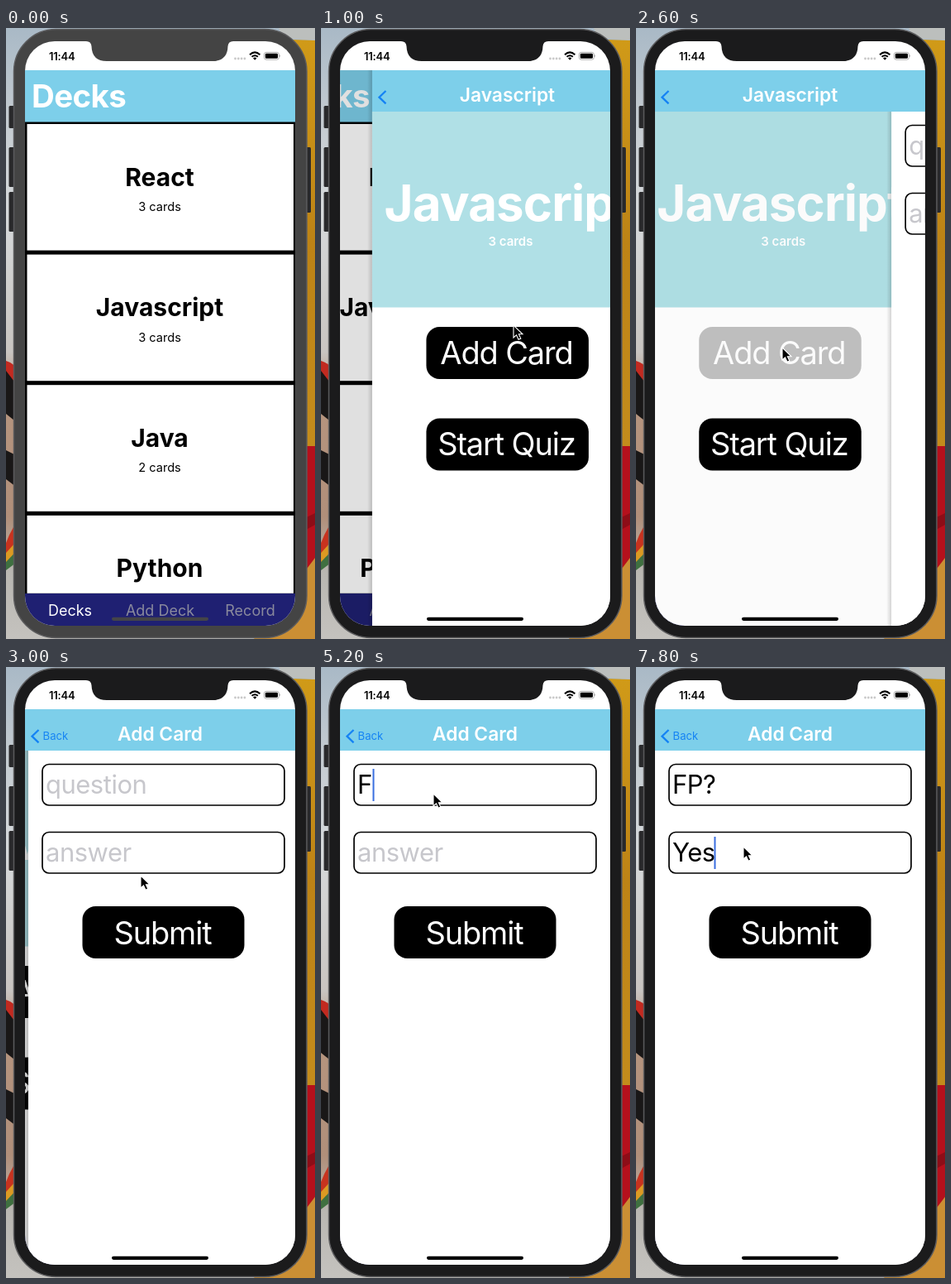
These frames come from a looping animation (374x738 px, 8000 ms). An HTML page:

```html
<!DOCTYPE html>
<html lang="en">
<head>
<meta charset="utf-8">
<title>Flash cards</title>
<style>
  html, body { margin: 0; width: 100%; height: 100%; overflow: hidden; background: #d8dadb; }
  svg { display: block; width: 374px; height: 738px; font-family: Inter, Roboto, sans-serif; }
  .mid { text-anchor: middle; }
  .deck { font-size: 30px; font-weight: 700; }
  .count { font-size: 14.6px; }
  .title { font-size: 22.8px; font-weight: 600; fill: #fff; }
  .button { font-size: 38px; letter-spacing: -1.15px; fill: #fff; }
  .field { font-size: 31px; letter-spacing: -.5px; }
  .tab { font-size: 18px; fill: #8a8a9d; }
  .box { fill: #fff; stroke: #000; stroke-width: 1.7; }
</style>
</head>
<body>
<svg viewBox="0 0 374 738">
  <defs>
    <clipPath id="glass"><rect x="23" y="16" width="327" height="706" rx="36"/></clipPath>
    <linearGradient id="edge">
      <stop offset="0" stop-opacity="0"/><stop offset="1" stop-opacity=".16"/>
    </linearGradient>
    <linearGradient id="wall" x2="0" y2="1">
      <stop offset="0" stop-color="#a9b9c6"/><stop offset=".14" stop-color="#c3cad0"/>
      <stop offset=".3" stop-color="#d6d9db"/><stop offset=".53" stop-color="#c9c5c1"/>
      <stop offset=".6" stop-color="#b6957f"/><stop offset=".8" stop-color="#b08f7a"/>
      <stop offset=".89" stop-color="#b9b7b2"/><stop offset="1" stop-color="#c4c2be"/>
    </linearGradient>
    <linearGradient id="gold" x2="0" y2="1">
      <stop offset="0" stop-color="#d09a18"/><stop offset=".5" stop-color="#bd8316"/>
      <stop offset="1" stop-color="#c48c1c"/>
    </linearGradient>
  </defs>

  <!-- wallpaper -->
  <rect width="374" height="738" fill="url(#wall)"/>
  <path d="M330 0H374V15L336 12Z" fill="#bcbfbd"/>
  <path d="M345 14L374 15V506H345Z" fill="url(#gold)"/>
  <path d="M345 505H374V690H345Z" fill="#b5101c"/>
  <path d="M345 600L374 586V600L345 616Z" fill="#8d0d17"/>
  <path d="M300 738L374 640V738Z" fill="#cb8f34"/>
  <path d="M0 402Q10 404 20 420V440L0 418Z" fill="#c22a20"/>
  <path d="M0 414L20 440V482L0 466ZM0 510L20 520V560L0 545Z" fill="#191717"/>
  <path d="M0 622Q8 600 20 590V618L0 640Z" fill="#c8331f"/>
  <path d="M0 634L20 612V628L0 648Z" fill="#dc9a23"/>
  <path d="M0 645L20 624V640L0 655Z" fill="#3f7040"/>

  <!-- phone body -->
  <g fill="#29292b">
    <rect x="3.5" y="94" width="8" height="27" rx="1.5"/>
    <rect x="3.5" y="144" width="8" height="48" rx="1.5"/>
    <rect x="3.5" y="198" width="8" height="48" rx="1.5"/>
    <rect x="362" y="144" width="7" height="79" rx="1.5"/>
  </g>
  <rect id="bezel" x="9.5" y="1.5" width="354.5" height="735" rx="51" stroke="#5b5b5d" stroke-width="1.5"/>

  <g clip-path="url(#glass)">
    <rect x="23" y="16" width="327" height="706" fill="#fff"/>

    <g id="list">
      <rect x="23" y="113" width="327" height="571"/>
      <rect x="23" y="51" width="327" height="62.5" fill="#7dcfea"/>
      <text x="31" y="96" fill="#fff" font-size="38.5" font-weight="700" letter-spacing="-.6">Decks</text>
      <g id="decks"></g>
      <rect x="23" y="683" width="327" height="39" fill="#1f2072"/>
      <text class="tab mid" x="77.5" y="710" style="fill:#fff">Decks</text>
      <text class="tab mid" x="186.5" y="710">Add Deck</text>
      <text class="tab mid" x="295.5" y="710">Record</text>
    </g>
    <rect id="listShade" x="23" y="51" width="327" height="671"/>

    <g id="detail">
      <rect x="17" y="51" width="6" height="671" fill="url(#edge)"/>
      <g id="detailBody">
        <rect x="23" y="101" width="327" height="621" fill="#fff"/>
        <rect x="23" y="101" width="327" height="236.5" fill="#b0e0e6"/>
        <text class="mid" x="187.5" y="232.5" fill="#fff" font-size="60" font-weight="700" letter-spacing="-.9">Javascript</text>
        <text class="mid" x="190.5" y="263" fill="#fff" font-size="15" font-weight="600">3 cards</text>
        <g id="addButton">
          <rect x="88.5" y="361" width="196.500" height="63" rx="16"/>
          <text class="button mid" x="185.5" y="406">Add Card</text>
        </g>
        <rect x="88.5" y="471.5" width="196.500" height="63" rx="16"/>
        <text class="button mid" x="185.5" y="516">Start Quiz</text>
      </g>
      <rect id="detailShade" x="23" y="101" width="327" height="621"/>

      <g id="form">
        <rect x="17" y="101" width="6" height="621" fill="url(#edge)"/>
        <rect x="23" y="101" width="327" height="621" fill="#fff"/>
        <rect class="box" x="40" y="117.5" width="293" height="49.5" rx="8"/>
        <rect class="box" x="40" y="199.5" width="293" height="49.5" rx="8"/>
        <text id="question" class="field" x="44" y="153"></text>
        <text id="answer" class="field" x="44" y="235"></text>
        <rect id="caret" width="2" height="39" fill="#3a6fe0"/>
        <rect x="88.5" y="289" width="196" height="63" rx="16"/>
        <text class="button mid" x="185.5" y="334.5">Submit</text>
      </g>

      <rect x="23" y="51" width="327" height="50" fill="#7dcfea"/>
      <path d="M39.5 76L31.5 83.7L39.5 91.4" fill="none" stroke="#1583f4" stroke-width="2.3"/>
      <text id="back" x="44.5" y="88.3" fill="#1583f4" font-size="13.2">Back</text>
      <text id="detailTitle" class="title mid" x="186.5" y="89">Javascript</text>
      <text id="formTitle" class="title mid" x="186.5" y="89">Add Card</text>
    </g>

    <!-- status bar -->
    <text x="52" y="38.5" font-size="13" font-weight="600" letter-spacing="-.2">11:44</text>
    <g fill="#c9c9c9">
      <circle cx="277.5" cy="37" r="1.4"/><circle cx="281.3" cy="37" r="1.4"/>
      <circle cx="285.1" cy="37" r="1.4"/><circle cx="288.9" cy="37" r="1.4"/>
    </g>
    <g fill="none" stroke="#000" stroke-width="2">
      <path d="M295 32.2Q301.2 26.6 307.4 32.2M297.5 34.8Q301.2 31.6 304.9 34.8"/>
    </g>
    <path d="M299 36.4Q301.2 34.8 303.4 36.4L301.2 38.8Z"/>
    <rect x="312.4" y="29.4" width="18" height="8.8" rx="2.6" fill="none" stroke="#999" stroke-width=".8"/>
    <rect x="313.8" y="30.8" width="15.2" height="6" rx="1.4"/>
    <path d="M331.4 32.3Q333 33.8 331.4 35.3Z" fill="#888"/>
    <rect id="homeBar" x="128" y="711.7" width="117" height="4.2" rx="2.1"/>
  </g>
  <path id="notch" d="M97 14V16Q103 16 103.500 22Q104 40 122 40H250Q268 40 268.500 22Q269 16 275 16V14Z"/>

  <path id="cursor" d="M0 0V15L3.500 11.800L6 17.300L8.800 16.100L6.400 10.800H11Z" stroke="#fff" stroke-width="1.1"/>
</svg>
<script>
  const LOOP = 8000, STEP = 200, WIDTH = 327;
  const el = Object.fromEntries([...document.querySelectorAll('[id]')].map(n => [n.id, n]));
  const clamp = v => Math.min(1, Math.max(0, v));
  const fade = (node, v) => node.setAttribute('opacity', clamp(v));
  const move = (node, x, y = 0) => node.setAttribute('transform', `translate(${x} ${y})`);

  const decks = [['React', 3], ['Javascript', 3], ['Java', 2], ['Python', 3]];
  el.decks.innerHTML = decks.map(([name, count], i) => {
    const y = 116 + i * 157.6, height = i < 3 ? 152.6 : 94;
    const cards = i < 3 ? `<text class="count mid" x="186" y="${y + 105}">${count} cards</text>` : '';
    return `<rect x="25.500" y="${y}" width="322.500" height="${height}" fill="#fff"/>
      <g><text class="deck mid" x="186" y="${y + 74.5}">${name}</text>${cards}</g>`;
  }).join('');
  const pressedDeck = el.decks.querySelectorAll('g')[1];

  // Rows are [time, ...values]
  const cursorPath = [[200, 268, 392], [600, 234, 358], [1000, 233, 359], [1600, 226, 364],
    [2200, 179, 386], [2600, 177, 386], [3000, 163, 252], [3600, 142, 154], [4200, 138, 137],
    [4600, 136, 153], [6200, 136, 153], [6800, 130, 217], [7800, 130, 217]];
  const deckPress = [[560, 1], [680, .35], [740, .35], [980, 1]];
  const addPress = [[2400, 1], [2560, .24], [2610, .24], [2860, 1]];
  const typing = [[0, '', '', null], [4000, '', '', [44.5, 123]], [5000, 'F', '', [62.5, 123]],
    [5400, 'FP', '', [82, 123]], [5800, 'FP?', '', [97.5, 123]], [6800, 'FP?', '', [44.5, 205]],
    [7200, 'FP?', 'Y', [64, 205]], [7400, 'FP?', 'Ye', [80, 205]], [7600, 'FP?', 'Yes', [94.5, 205]]];

  function tween(rows, t) {
    const next = rows.findIndex(r => r[0] > t);
    if (next === 0) return rows[0].slice(1);
    if (next < 0) return rows.at(-1).slice(1);
    const a = rows[next - 1], b = rows[next], k = (t - a[0]) / (b[0] - a[0]);
    return a.slice(1).map((v, i) => v + (b[i + 1] - v) * k);
  }

  // Critically damped spring, 0 to 1, settled once under half a pixel remains
  function push(start, t) {
    const w = Math.max(0, t - start) * .0145;
    const left = (1 + w) * Math.exp(-w);
    return left * WIDTH < .5 ? 1 : 1 - left;
  }

  function setField(node, value, hint) {
    node.textContent = value || hint;
    node.setAttribute('fill', value ? '#000' : '#c7c7cc');
  }

  function draw(t) {
    const open = push(747, t), form = push(2558, t);
    const active = t >= 400, frame = active ? '#1b1b1c' : '#444';
    el.bezel.setAttribute('fill', frame);
    el.notch.setAttribute('fill', frame);
    el.homeBar.setAttribute('fill', open > 0 ? '#000' : '#444448');

    move(el.list, -.3 * WIDTH * open);
    fade(el.listShade, .14 * open);
    move(el.detail, WIDTH * (1 - open));
    el.detail.style.display = open ? '' : 'none';
    move(el.detailBody, -.3 * WIDTH * form);
    fade(el.detailShade, .14 * form);
    move(el.form, WIDTH * (1 - form));
    el.form.style.display = form ? '' : 'none';
    fade(el.detailTitle, 1.25 - 2 * form);
    fade(el.formTitle, 2 * form - 1);
    fade(el.back, 2 * form - 1);
    fade(pressedDeck, tween(deckPress, t)[0]);
    fade(el.addButton, tween(addPress, t)[0]);

    const [, question, answer, caret] = typing.findLast(r => r[0] <= t);
    setField(el.question, question, 'question');
    setField(el.answer, answer, 'answer');
    fade(el.caret, caret ? 1 : 0);
    if (caret) move(el.caret, ...caret);

    fade(el.cursor, t >= 200 ? 1 : 0);
    move(el.cursor, ...tween(cursorPath, t));
  }

  const began = performance.now();
  function tick() {
    const t = (performance.now() - began) % LOOP;
    draw(Math.floor(t / STEP) * STEP);
    requestAnimationFrame(tick);
  }
  tick();
</script>
</body>
</html>
```
